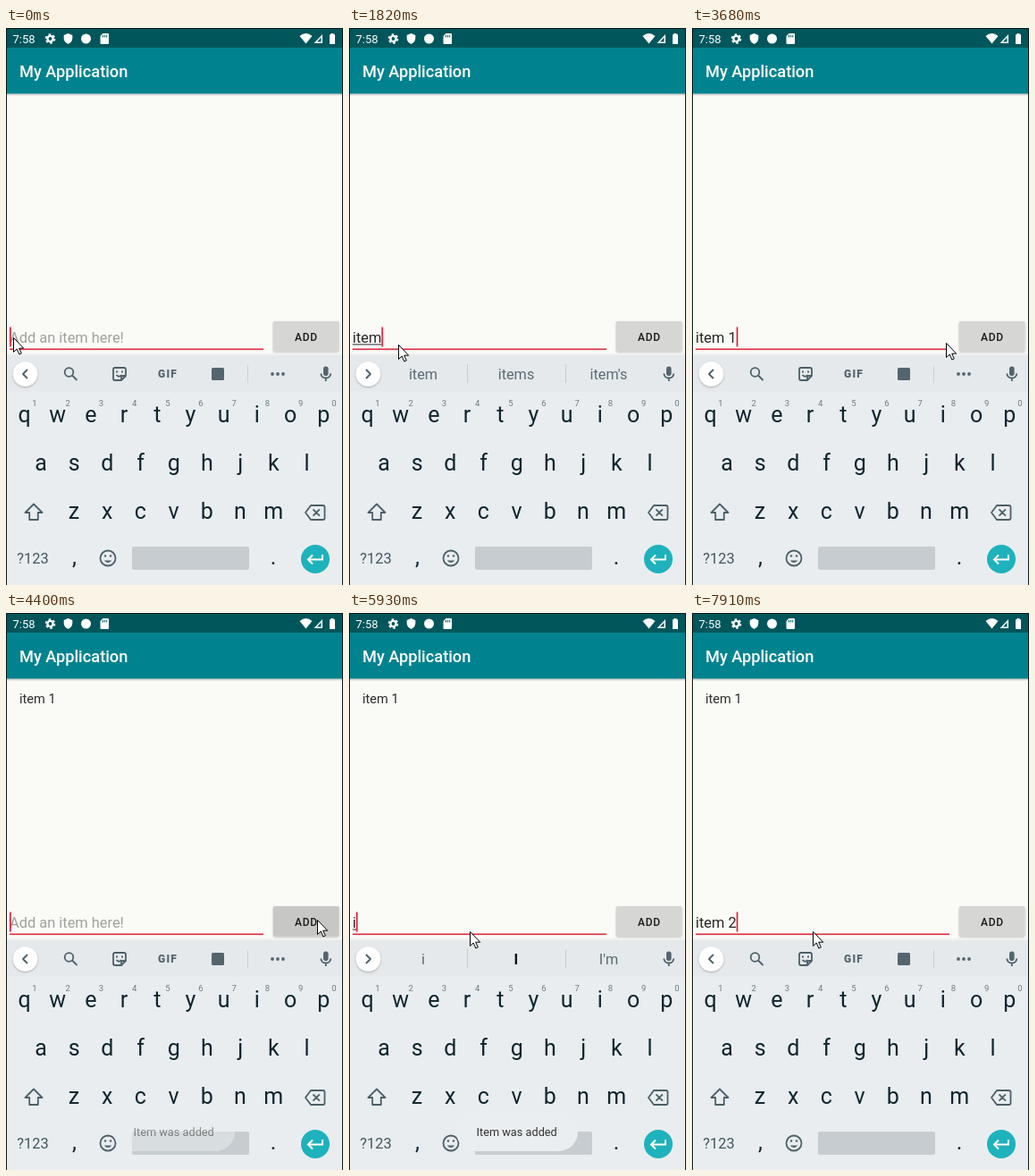
An HTML page for the animation above (8 s loop, 377 px wide and 623 px high).

```html
<!DOCTYPE html>
<html lang="en">
<head>
<meta charset="utf-8">
<title>Add an item</title>
<style>
  html, body { margin: 0; width: 100%; height: 100%; overflow: hidden; background: #fafaf6; }
  svg { display: block; width: 377px; height: 623px; font-family: Roboto, sans-serif; }
  text { white-space: pre; }
  .mid { text-anchor: middle; }
  .key { font-size: 25px; fill: #10252e; }
  .alt { font-size: 9.5px; fill: #6c7a82; }
  .word { font-size: 16.3px; fill: #5c6b73; }
  .strong { font-weight: 700; fill: #101010; }
  .line { fill: none; stroke: #4d5f68; stroke-width: 1.8; stroke-linejoin: round; }
  .solid { fill: #54656e; }
  .white { fill: #fff; }
</style>
</head>
<body>
<svg id="stage" viewBox="0 0 377 623">
  <defs>
    <linearGradient id="fade" x2="0" y2="1">
      <stop stop-color="#000" stop-opacity=".2"/>
      <stop offset="1" stop-color="#000" stop-opacity="0"/>
    </linearGradient>
    <filter id="soft" x="-20%" y="-20%" width="140%" height="150%">
      <feDropShadow dx="0" dy="1" stdDeviation=".9" flood-opacity=".3"/>
    </filter>
  </defs>

  <rect width="377" height="623" fill="#fafaf6"/>
  <rect width="377" height="22" fill="#00565b"/>
  <rect y="22" width="377" height="51.5" fill="#00838f"/>
  <rect y="73.5" width="377" height="3" fill="url(#fade)"/>
  <text x="15" y="55" font-size="18.2" font-weight="500" class="white">My Application</text>

  <g id="status" class="white">
    <text x="7.5" y="17" font-size="13">7:58</text>
    <circle cx="49.5" cy="12" r="3.1" fill="none" stroke="#fff" stroke-width="2.4"/>
    <circle cx="49.5" cy="12" r="4.9" fill="none" stroke="#fff" stroke-width="1.8" stroke-dasharray="2.57"/>
    <path d="M69.5 6l4.8 2v3.6c0 3-2 5.300-4.800 6.400-2.800-1.100-4.800-3.400-4.800-6.400V8z"/>
    <circle cx="89.500" cy="12" r="5.500"/>
    <path d="M108.500 6h5.500q1 0 1 1v10q0 1-1 1h-7.500q-1 0-1-1V9z"/>
    <path d="M108.500 8v2.500M110.600 8v2.500M112.700 8v2.500" stroke="#00565b"/>
    <path d="M328.500 9Q335.500 3 342.500 9L335.500 17.500z"/>
    <path d="M354 7v10h-9.500zM352.500 10.500v5h-4.500z" fill-rule="evenodd"/>
    <path d="M363.500 6h3v1.300h1.500v10.700h-6V7.300h1.500z"/>
  </g>

  <text id="entry" x="15" y="101" font-size="14.6" fill="#2c2c2c">item 1</text>

  <text id="hint" x="4" y="352" font-size="16.4" fill="#a0a09d">Add an item here!</text>
  <text id="field" x="4" y="352" font-size="16.4" fill="#262626"></text>
  <rect id="compose" x="4" y="353.500" height="1" fill="#262626"/>
  <rect x="4" y="358.500" width="284" height="1.600" fill="#df2b3c"/>
  <rect id="caret" y="334.500" width="1.700" height="22" fill="#e3203d"/>

  <rect x="299" y="328" width="73.500" height="33.500" rx="1.500" fill="#d6d7d5" filter="url(#soft)"/>
  <rect id="press" x="299" y="328" width="73.500" height="33.500" rx="1.500"/>
  <text x="323" y="349.500" font-size="12" font-weight="500" letter-spacing=".7" fill="#1b1b1b">ADD</text>

  <rect y="364" width="377" height="2" fill="#eff1ef"/>
  <rect y="366" width="377" height="257" fill="#e9edef"/>
  <rect y="366" width="377" height="40.500" fill="#e5e9eb"/>

  <circle cx="21.500" cy="387" r="13.700" fill="#fff" filter="url(#soft)"/>
  <path id="chevron" class="line" stroke-width="2"/>
  <g id="tools">
    <circle cx="70.500" cy="385" r="4.800" class="line"/>
    <path d="M74 388.500l5.500 5.500" class="line" stroke-width="2.200"/>
    <path d="M122 380h10q2 0 2 2v7l-5 5h-7q-2 0-2-2v-10q0-2 2-2zM134 389h-3q-2 0-2 2v3M123.500 388q3 3.500 6 0" class="line" stroke-width="1.600"/>
    <path d="M123 383.500h2v2h-2zM129 383.500h2v2h-2z" class="solid"/>
    <text x="170" y="391" font-size="12" font-weight="900" letter-spacing="1.200" class="solid">GIF</text>
    <rect x="230" y="380" width="14" height="14" rx="1.500" class="solid"/>
    <path d="M270.500 377v20" stroke="#cbd1d4"/>
    <g class="solid"><circle cx="298" cy="387" r="1.900"/><circle cx="304" cy="387" r="1.900"/><circle cx="310" cy="387" r="1.900"/></g>
  </g>
  <g id="words">
    <path d="M132.500 376v21M242.500 376v21" stroke="#c6cccf"/>
    <text class="mid word" x="83" y="392.500"></text>
    <text class="mid word" x="187" y="392.500"></text>
    <text class="mid word" x="290.500" y="392.500"></text>
  </g>
  <rect x="355" y="378.500" width="5.600" height="10.500" rx="2.800" class="solid"/>
  <path d="M352.300 386.500q.5 5 5.500 5t5.500-5M357.800 391.500v3.500" class="line" stroke-width="1.600"/>

  <g id="keys"></g>
  <path d="M31 532.500l-9.500 9.500h4.700v8h9.600v-8h4.700z" class="line"/>
  <path d="M341 534h13.500q2 0 2 2v12q0 2-2 2H341l-6-8zM343.500 538.300l7.400 7.400M350.900 538.300l-7.400 7.400" class="line"/>
  <text class="mid" x="30" y="599" font-size="16.400" fill="#43555e">?123</text>
  <circle cx="114" cy="593" r="8.500" class="line"/>
  <path d="M109.700 595.500q4.300 5 8.600 0z" class="solid"/>
  <circle cx="111" cy="590.500" r="1.300" class="solid"/>
  <circle cx="117" cy="590.500" r="1.300" class="solid"/>
  <rect x="141" y="580" width="131" height="26" rx="2" fill="#c6cccf"/>
  <circle cx="346" cy="594" r="16" fill="#1eb2bc"/>
  <path d="M354 589v5.500h-15.500M343 589.500l-5 5 5 5" fill="none" stroke="#fff" stroke-width="2"/>

  <g id="toast">
    <rect x="120" y="559" width="136" height="43" rx="21.500" fill="#eaeef0"/>
    <text x="142.500" y="585" font-size="12.750" fill="#333">Item was added</text>
  </g>

  <path d="M.5 623V.5h376V623" fill="none" stroke="#0b1718"/>
  <path id="mouse" d="M.5.5v16l3.700-3.500 2.600 6 2.500-1.100-2.600-5.700h5z" fill="#fff" stroke="#000"/>
</svg>
<script>
const LOOP = 8000;
const $ = id => document.getElementById(id);

// Keyboard rows: letters, first centre, baseline
const rows = [['qwertyuiop', 20.500, 441], ['asdfghjkl', 39, 495], ['zxcvbnm', 76, 549], [',', 76.500, 600], ['.', 299, 600]];
$('keys').innerHTML = rows.map(([letters, x0, y], row) => [...letters].map((c, i) => {
  const x = x0 + i * 37.200;
  const digit = row ? '' : `<text class="mid alt" x="${x + 11.500}" y="423">${(i + 1) % 10}</text>`;
  return `<text class="mid key" x="${x}" y="${y}">${c}</text>${digit}`;
}).join('')).join('');

// Each table: [time, value...], held until the next row
const typed = [[0, ''], [1400, 'i'], [1480, 'it'], [1760, 'ite'], [1820, 'item'], [2430, 'item '], [2610, 'item 1'],
  [4100, ''], [5930, 'i'], [5990, 'it'], [6290, 'ite'], [6350, 'item'], [7500, 'item '], [7800, 'item 2']];
const blink = [[0, 1], [60, 0], [470, 1], [1030, 0], [1400, 1], [2310, 0], [2430, 1], [3070, 0], [3570, 1], [4020, 0],
  [4100, 1], [4690, 0], [5190, 1], [5650, 0], [5930, 1], [7380, 0], [7500, 1]];
const guesses = [[0], [1400, 'i', 'I', "I'm"], [1480, 'it', 'its', "it's"], [1760, 'item', 'items', "item's"],
  [2430, 'is', 'in', 'and'], [2700], [5930, 'i', 'I', "I'm"], [5990, 'it', 'its', "it's"],
  [6290, 'item', 'items', 'itemized'], [7500, 'is', 'in', 'and'], [7860]];

// Pointer and opacity tables are interpolated
const route = [[0, 7, 346], [60, 12, 347], [160, 34, 351], [260, 52, 353], [709, 52, 353], [710, 55, 354], [3300, 55, 354],
  [3400, 82, 357], [3600, 240, 356], [3750, 351, 346], [3800, 348, 343], [4430, 348, 343], [4600, 270, 350],
  [4770, 182, 355], [4890, 142, 355], [4940, 135, 356], [LOOP, 135, 356]];
const pressed = [[0, 0], [4020, 0], [4100, .07], [4420, .07], [4700, 0], [LOOP, 0]];
const shown = [[0, 0], [4260, 0], [4530, 1], [6430, 1], [6800, 0], [LOOP, 0]];

const hold = (table, t) => table.findLast(row => row[0] <= t).slice(1);

function blend(table, t) {
  const i = table.findLastIndex(row => row[0] <= t);
  const a = table[i], b = table[i + 1] || a;
  const p = b === a ? 0 : (t - a[0]) / (b[0] - a[0]);
  return a.slice(1).map((v, k) => v + (b[k + 1] - v) * p);
}

const show = (el, on) => el.setAttribute('visibility', on ? 'visible' : 'hidden');
const slots = [...$('words').querySelectorAll('text')];

function draw(t) {
  const [text] = hold(typed, t);
  const words = hold(guesses, t);
  const field = $('field');
  if (field.textContent !== text) field.textContent = text;
  const width = text ? field.getComputedTextLength() : 0;

  show($('hint'), !text);
  show($('compose'), text && !text.includes(' '));
  $('compose').setAttribute('width', width);
  $('caret').setAttribute('x', 4 + width);
  show($('caret'), hold(blink, t)[0]);

  show($('tools'), !words.length);
  show($('words'), words.length);
  slots.forEach((slot, i) => {
    slot.textContent = words[i] || '';
    slot.classList.toggle('strong', words[i] === 'I');
  });
  $('chevron').setAttribute('d', words.length ? 'M19 382l5 5-5 5' : 'M24 382l-5 5 5 5');

  show($('entry'), t >= 4100);
  $('press').setAttribute('opacity', blend(pressed, t)[0]);
  $('toast').setAttribute('opacity', blend(shown, t)[0]);

  // The pointer is sampled about every 50 ms
  const [x, y] = blend(route, Math.floor(t / 50 + 1e-6) * 50 + 10);
  $('mouse').setAttribute('transform', `translate(${Math.round(x)} ${Math.round(y)})`);
}

const start = performance.now();
function tick() {
  draw((performance.now() - start) % LOOP);
  requestAnimationFrame(tick);
}
tick();
</script>
</body>
</html>
```
